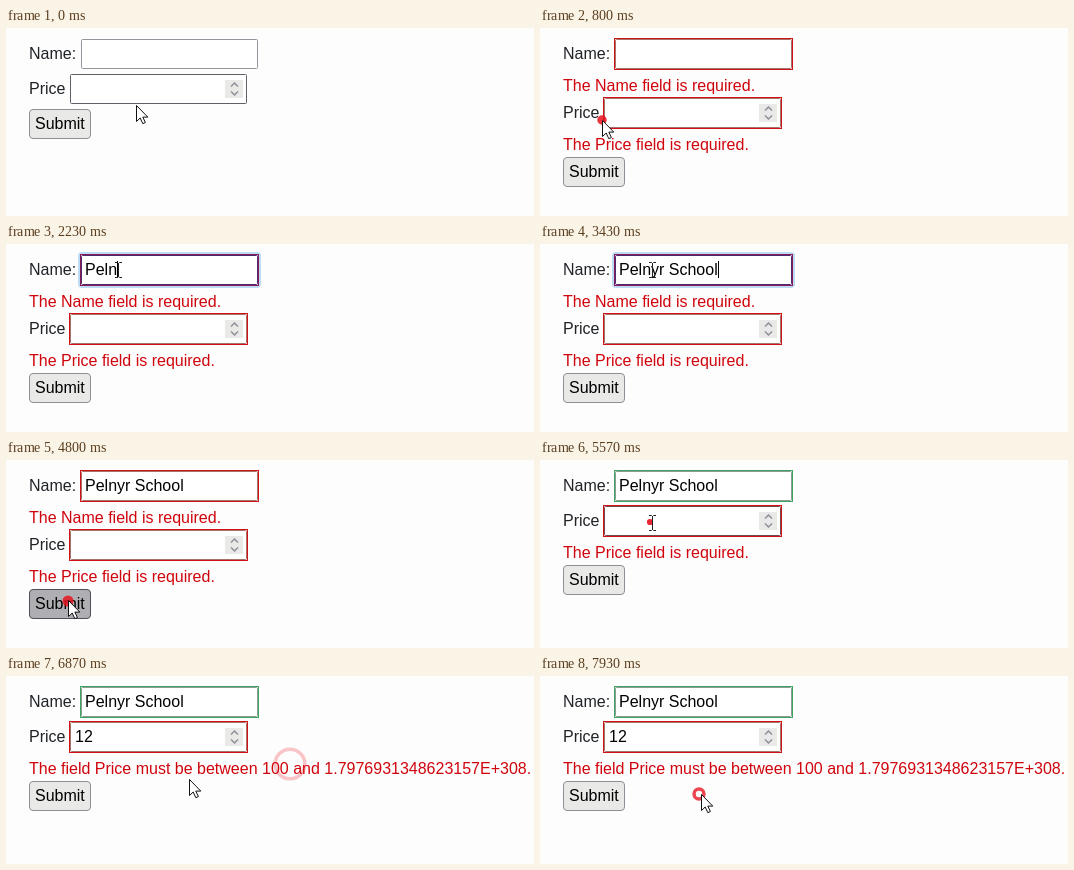
Animation of 528x188 px, one loop 8 s. Source, as an HTML page:

```html
<!DOCTYPE html>
<html lang="en">
<head>
<meta charset="utf-8">
<title>Form validation</title>
<style>
  html, body { margin: 0; width: 100%; height: 100%; overflow: hidden; background: #fdfdfd; }
  svg { display: block; }
  text { font: 16px "Liberation Sans", Arial, sans-serif; fill: #202328; white-space: pre; }
  .value, #submit text { fill: #000; }
  .error { fill: #d0040c; }
  .glow, .outer { fill: none; }
  .glow { stroke: #bcdcf6; stroke-width: 2; }
  .box { fill: #fff; }
  .caret { stroke: #000; }
</style>
</head>
<body>
<svg width="528" height="188" viewBox="0 0 528 188">
  <text x="23" y="31">Name:</text>
  <g id="name" transform="translate(75 11)">
    <rect class="glow" x="-2" y="-2" width="181" height="34" rx="3"/>
    <rect class="outer" x="-.5" y="-.5" width="178" height="31"/>
    <rect class="box" x=".5" y=".5" width="176" height="29" rx="1"/>
    <text class="value" x="4" y="20"></text>
    <path class="caret" d="M4.5 6v17"/>
  </g>
  <text id="nameError" class="error" x="23" y="63">The Name field is required.</text>
  <g id="priceRow">
    <text x="23" y="66">Price</text>
    <g id="price" transform="translate(64 46)">
      <rect class="glow" x="-2" y="-2" width="181" height="34" rx="3"/>
      <rect class="outer" x="-.5" y="-.5" width="178" height="31"/>
      <rect class="box" x=".5" y=".5" width="176" height="29" rx="1"/>
      <path d="M155 6h18v18h-18z" fill="#e9e9e8"/>
      <path d="M161 12.5l3.5-3.5 3.500 3.5M161 17.5l3.5 3.5 3.5-3.5" fill="none" stroke="#8f8f98" stroke-width="1.5"/>
      <text class="value" x="5" y="20"></text>
      <path class="caret" d="M4.5 6v17"/>
    </g>
    <text id="priceError" class="error" x="23" y="98"></text>
  </g>
  <g id="submit">
    <rect id="face" x="23.5" y=".5" width="61" height="29" rx="3.5"/>
    <text x="29" y="20">Submit</text>
  </g>
  <g id="rings"></g>
  <path id="arrow" d="M.5 .5v16l3.7-3.5 2.6 5.7 2.6-1.2-2.6-5.4h5z" fill="#fff" stroke="#111"/>
  <path id="beam" d="M-3 -7.5h2.5l1 1 1-1h2.5M.5 -7v14M-3 7.5h2.5l1-1 1 1h2.5" fill="none" stroke="#222"/>
</svg>
<script>
const LOOP = 8000, RING = 600;
const $ = id => document.getElementById(id);

// time, x, y of the pointer
const path = [
  [0, 130, 77], [130, 130, 77], [470, 62, 92], [850, 62, 92], [1080, 111, 25],
  [3900, 111, 25], [4330, 62, 140], [5300, 62, 140], [5480, 111, 62], [6130, 111, 62],
  [6310, 284, 88], [6642, 284, 88], [7130, 62, 120], [7450, 62, 120], [7760, 161, 118], [LOOP, 161, 118]
];
const clicks = [[690, 62, 92], [1110, 111, 25], [4670, 62, 141], [5500, 110, 62], [6330, 284, 88], [7270, 62, 120], [7770, 159, 118]];
const rings = clicks.map(([, x, y]) => {
  const c = document.createElementNS("http://www.w3.org/2000/svg", "circle");
  c.setAttribute("cx", x);
  c.setAttribute("cy", y);
  return $("rings").appendChild(c);
});

const nameKeys = [1600, 1970, 2030, 2230, 2310, 2390, 2470, 2630, 2830, 2870, 3070, 3200, 3300];
const priceKeys = [5930, 6060];

const between = (t, a, b) => t >= a && t < b;
const set = (el, attrs) => { for (const k in attrs) el.setAttribute(k, attrs[k]); };
const show = (el, on) => el.style.display = on ? "" : "none";
const move = (el, x, y) => el.setAttribute("transform", `translate(${x} ${y})`);

function pointer(t) {
  const i = path.findIndex(p => p[0] > t);
  const [t0, x0, y0] = path[i - 1], [t1, x1, y1] = path[i];
  const p = (t - t0) / (t1 - t0), s = p * p * (3 - 2 * p);
  return [Math.round(x0 + (x1 - x0) * s), Math.round(y0 + (y1 - y0) * s)];
}

function drawField(field, t, { word, keys, focus, state, hover }) {
  const part = c => field.querySelector("." + c);
  const [from, to] = focus, focused = between(t, from, to);
  const typed = keys.filter(k => k <= t);
  const value = part("value"), text = word.slice(0, typed.length);
  if (value.textContent !== text) value.textContent = text;

  const outer = { valid: "#3ca660", invalid: "#d21216", plain: "none" }[state];
  const inner = { valid: "#8a9c94", invalid: hover ? "#74484c" : "#a4746c", plain: hover ? "#606068" : "#94949c" }[state];
  show(part("glow"), focused);
  set(part("outer"), { stroke: focused ? "#8a1c54" : outer });
  set(part("box"), { stroke: focused ? "#4c2a74" : inner });

  const since = t - (typed.length ? typed[typed.length - 1] : from);
  show(part("caret"), focused && since % 1000 < 500);
  move(part("caret"), text ? Math.round(value.getComputedTextLength()) : 0, 0);
}

function drawRing(ring, age) {
  show(ring, between(age, 0, RING));
  const p = Math.min(1, Math.max(0, age / RING));
  const r = 17 * (1 - (1 - p) ** 1.6);
  const w = Math.min(r, 3.5), color = "#e8101c";
  set(ring, {
    r: r - w / 2, stroke: color, "stroke-width": w,
    fill: r < 6 ? color : "none", opacity: 1 - 0.85 * p
  });
}

function draw(t) {
  const nameBad = between(t, 800, 4860), priceBad = t >= 800;
  const shift = nameBad ? 24 : 0, top = 81 + shift + (priceBad ? 24 : 0);
  const [x, y] = pointer(t);
  const over = (l, u, w, h) => between(x, l, l + w) && between(y, u, u + h);

  show($("nameError"), nameBad);
  move($("priceRow"), 0, shift);
  $("priceError").textContent = !priceBad ? "" : t < 6370
    ? "The Price field is required."
    : "The field Price must be between 100 and 1.7976931348623157E+308.";

  drawField($("name"), t, {
    word: "Pelnyr School", keys: nameKeys, focus: [1130, 4690],
    state: nameBad ? "invalid" : priceBad ? "valid" : "plain", hover: over(75, 11, 177, 30)
  });
  drawField($("price"), t, {
    word: "12", keys: priceKeys, focus: [5600, 6350],
    state: priceBad ? "invalid" : "plain", hover: over(64, 46 + shift, 177, 32)
  });

  const pressed = between(t, 690, 800) || between(t, 4690, 4860) || between(t, 7290, 7400);
  const hover = over(23, top, 62, 30);
  move($("submit"), 0, top);
  set($("face"), {
    fill: pressed ? "#afafb3" : hover ? "#d0d0d5" : "#e9e9e8",
    stroke: pressed ? "#50505a" : hover ? "#676774" : "#8f8f98"
  });

  rings.forEach((ring, i) => drawRing(ring, t - clicks[i][0]));

  const beam = over(75, 11, 177, 30) || over(64, 46 + shift, 150, 30);
  show($("beam"), beam);
  show($("arrow"), !beam);
  move($("beam"), x + 1, y + 1);
  move($("arrow"), x, y);
}

function tick() {
  draw(performance.now() % LOOP);
  requestAnimationFrame(tick);
}
tick();
</script>
</body>
</html>
```
